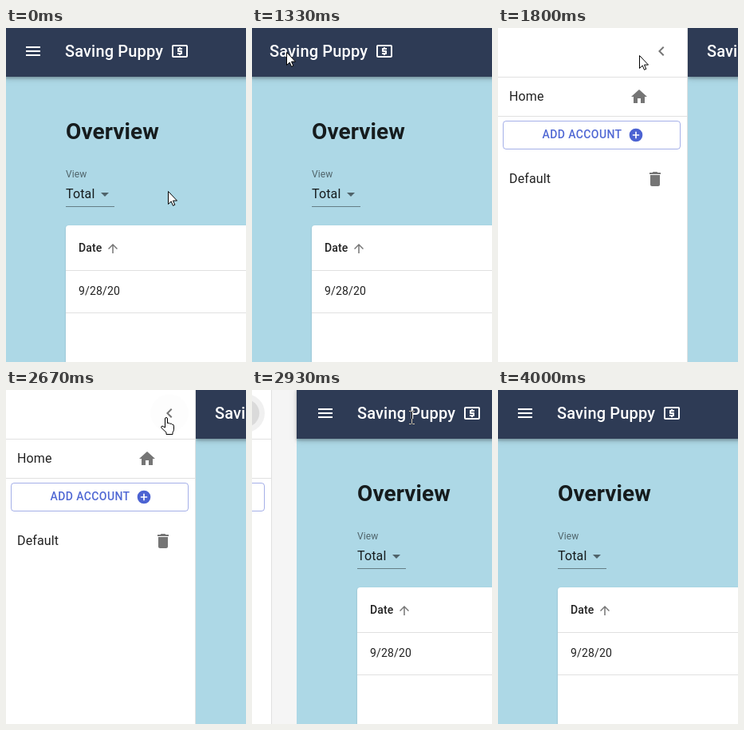
Recreate the animation shown at these times as an HTML page. Size 301 by 418 pixels, loop 4470 ms.

```html
<!DOCTYPE html>
<html lang="en">
<head>
<meta charset="utf-8">
<title>Overview</title>
<style>
html, body { margin: 0; width: 100%; height: 100%; overflow: hidden; background: #f5f5f5; }
svg { display: block; }
text { font: 400 16px Roboto, sans-serif; letter-spacing: .15px; fill: #000; fill-opacity: .87; }
.title { font-size: 20px; font-weight: 500; fill: #fff; fill-opacity: 1; }
.head { font-size: 28px; font-weight: 700; letter-spacing: .1px; }
.label { font-size: 12px; letter-spacing: .11px; fill-opacity: .54; }
.cell { font-size: 14px; }
.bold { font-weight: 500; }
.button { font-size: 14px; font-weight: 500; letter-spacing: .4px; fill: #5068d4; fill-opacity: 1; }
.grey { fill: #000; fill-opacity: .54; }
.line { fill: #e0e0e0; }
#bar { filter: drop-shadow(0 2px 1.5px rgba(0,0,0,.16)) drop-shadow(0 3px 2.5px rgba(0,0,0,.12)) drop-shadow(0 1px 5px rgba(0,0,0,.1)); }
#card { filter: drop-shadow(0 1px 1px rgba(0,0,0,.14)); }
#beam { mix-blend-mode: difference; }
</style>
</head>
<body>
<svg width="301" height="418" viewBox="0 0 301 418">
  <rect width="301" height="418" fill="#f5f5f5"/>
  <g id="page">
    <rect x="-2" width="320" height="418" fill="#add8e6"/>
  </g>
  <g id="content">
    <text class="head" x="75" y="139">Overview</text>
    <text class="label" x="75" y="187">View</text>
    <text x="75" y="213">Total</text>
    <path class="grey" transform="translate(112 196)" d="M7 10l5 5 5-5z"/>
    <rect x="75" y="223" width="61" height="1" fill-opacity=".42"/>
    <rect id="card" x="75" y="247" width="400" height="200" rx="4" fill="#fff"/>
    <rect class="line" x="75" y="303" width="400" height="1"/>
    <rect class="line" x="75" y="356" width="400" height="1"/>
    <text class="cell bold" x="91" y="280">Date</text>
    <path class="grey" transform="translate(125 267) scale(.75)" d="M4 12l1.41 1.41L11 7.83V20h2V7.83l5.58 5.59L20 12l-8-8-8 8z"/>
    <text class="cell" x="91" y="334">9/28/20</text>
  </g>
  <g id="header">
    <rect id="bar" x="-2" y="-3" width="360" height="64" fill="#2e3b55"/>
    <g id="menu">
      <circle id="menuRipple" cx="34" cy="29" fill="#fff" fill-opacity=".2"/>
      <path transform="translate(22 17)" fill="#fff" d="M3 18h18v-2H3v2zm0-5h18v-2H3v2zm0-7v2h18V6H3z"/>
    </g>
    <g id="brand">
      <text class="title" x="74" y="36">Saving Puppy</text>
      <path transform="translate(206 17)" fill="#fff" d="M11 17h2v-1h1c.55 0 1-.45 1-1v-3c0-.55-.45-1-1-1h-3v-1h4V8h-2V7h-2v1h-1c-.55 0-1 .45-1 1v3c0 .55.45 1 1 1h3v1H9v2h2v1zm9-13H4c-1.11 0-2 .89-2 2v12c0 1.11.89 2 2 2h16c1.11 0 2-.89 2-2V6c0-1.11-.89-2-2-2zm0 14H4V6h16v12z"/>
    </g>
  </g>
  <g id="drawer">
    <rect x="-2" width="240" height="418" fill="#fff"/>
    <rect class="line" x="237" width="1" height="418"/>
    <rect class="line" x="-2" y="61" width="239" height="1"/>
    <rect class="line" x="-2" y="110" width="239" height="1"/>
    <circle id="hover" cx="205" cy="29" r="24"/>
    <circle id="backRipple" cx="205" cy="29" fill-opacity=".09"/>
    <path class="grey" transform="translate(193 17)" d="M15.41 7.41L14 6l-6 6 6 6 1.41-1.41L10.83 12z"/>
    <text x="14" y="91">Home</text>
    <path class="grey" transform="translate(165 74)" d="M10 20v-6h4v6h5v-8h3L12 3 2 12h3v8z"/>
    <rect x="6.5" y="116.5" width="222" height="35" rx="3.5" fill="none" stroke="#4c63d2" stroke-opacity=".5"/>
    <text class="button" x="55.5" y="138">ADD ACCOUNT</text>
    <path fill="#4c63d2" transform="translate(163 124) scale(.8333)" d="M12 2a10 10 0 1 0 0 20 10 10 0 1 0 0-20zm5 11h-4v4h-2v-4H7v-2h4V7h2v4h4v2z"/>
    <text x="14" y="194">Default</text>
    <path class="grey" transform="translate(185 177)" d="M6 19c0 1.1.9 2 2 2h8c1.1 0 2-.9 2-2V7H6v12zM19 4h-3.5l-1-1h-5l-1 1H5v2h14V4z"/>
  </g>
  <g id="cursor" stroke="#000">
    <path id="arrow" fill="#fff" d="M.5.5v16l3.7-3.5 2.3 5.3 2.3-1-2.3-5.2h5z"/>
    <path id="hand" fill="#fff" d="M-.5 13V2a1.5 1.5 0 0 1 3 0v5.5q2-1 3 .7 2-.8 2.8.9 2.2-.4 2.2 2v4q0 2-1.5 4v2.4h-8v-2.4L-5 13.5q-1-2 1-2.5z"/>
    <path id="beam" fill="none" stroke="#fff" d="M-3 -7.5h2.5l1 1 1-1H4M.5-6.5v14M-3 8.5h2.5l1-1 1 1H4"/>
  </g>
</svg>
<script>
const LOOP = 4470, STEP = 1000 / 15, WIDTH = 240;
const $ = id => document.getElementById(id);
const move = (id, x, y = 0) =>
  $(id).setAttribute('transform', `translate(${Math.round(x)} ${Math.round(y)})`);
const show = (id, on) => $(id).style.display = on ? '' : 'none';

// Cubic Bézier easing, solved by bisection
function bezier(x1, y1, x2, y2) {
  const at = (a, b, s) => 3 * (1 - s) ** 2 * s * a + 3 * (1 - s) * s * s * b + s ** 3;
  return x => {
    if (x <= 0) return 0;
    if (x >= 1) return 1;
    let lo = 0, hi = 1;
    for (let i = 0; i < 24; i++) {
      const mid = (lo + hi) / 2;
      if (at(x1, x2, mid) < x) lo = mid; else hi = mid;
    }
    return at(y1, y2, lo);
  };
}
const easeOut = bezier(0, 0, .2, 1);
const sharp = bezier(.4, 0, .6, 1);
const standard = bezier(.4, 0, .2, 1);

// Pointer path: step, x, y
const path = [
  [0, 203, 204], [2, 178, 172], [4, 115, 100], [6, 62, 49], [8, 44, 34], [10, 43, 30],
  [20, 43, 30], [22, 46, 30], [23, 50, 32], [24, 64, 36], [25, 101, 39], [26, 146, 37],
  [27, 177, 34], [29, 194, 33], [33, 200, 34], [54, 200, 34], [55, 206, 50],
  [56, 196, 105], [57, 172, 190], [58, 135, 290], [59, 91, 387], [60, 60, 430]
];
function pointer(k) {
  const i = path.findIndex(p => p[0] >= k);
  if (i < 1) return path[0].slice(1);
  const [a, x0, y0] = path[i - 1], [b, x1, y1] = path[i], f = (k - a) / (b - a);
  return [x0 + (x1 - x0) * f, y0 + (y1 - y0) * f];
}

function ripple(id, t, start) {
  $(id).setAttribute('r', 24 * standard((t - start) / 550));
}

function draw(k) {
  const t = k * STEP;
  const opened = easeOut((t - 1334) / 225);
  const shift = WIDTH * (opened - sharp((t - 2804) / 195));
  const slide = WIDTH * (opened - sharp((t - 2783) / 195));
  const open = k >= 20 && k < 42;

  move('page', shift);
  move('header', shift);
  move('content', shift * .977);
  move('drawer', slide - WIDTH);
  move('brand', open ? -52 : 0);
  show('menu', !open);
  show('menuRipple', k < 20);
  ripple('menuRipple', t, 1150);
  ripple('backRipple', t, 2680);
  $('hover').setAttribute('fill-opacity', .06 * standard((t - 2640) / 150));

  const beam = k >= 43 && k < 55;
  const hand = (k >= 7 && k < 20) || (k >= 28 && k < 43);
  show('cursor', k < 60);
  show('beam', beam);
  show('hand', hand);
  show('arrow', !beam && !hand);
  if (k < 60) move('cursor', ...pointer(k));
}

// The picture advances 15 times a second
let origin;
function tick(now) {
  origin ??= now;
  draw(Math.floor(((now - origin) % LOOP + 3.4) / STEP));
  requestAnimationFrame(tick);
}
draw(0);
requestAnimationFrame(tick);
</script>
</body>
</html>
```
